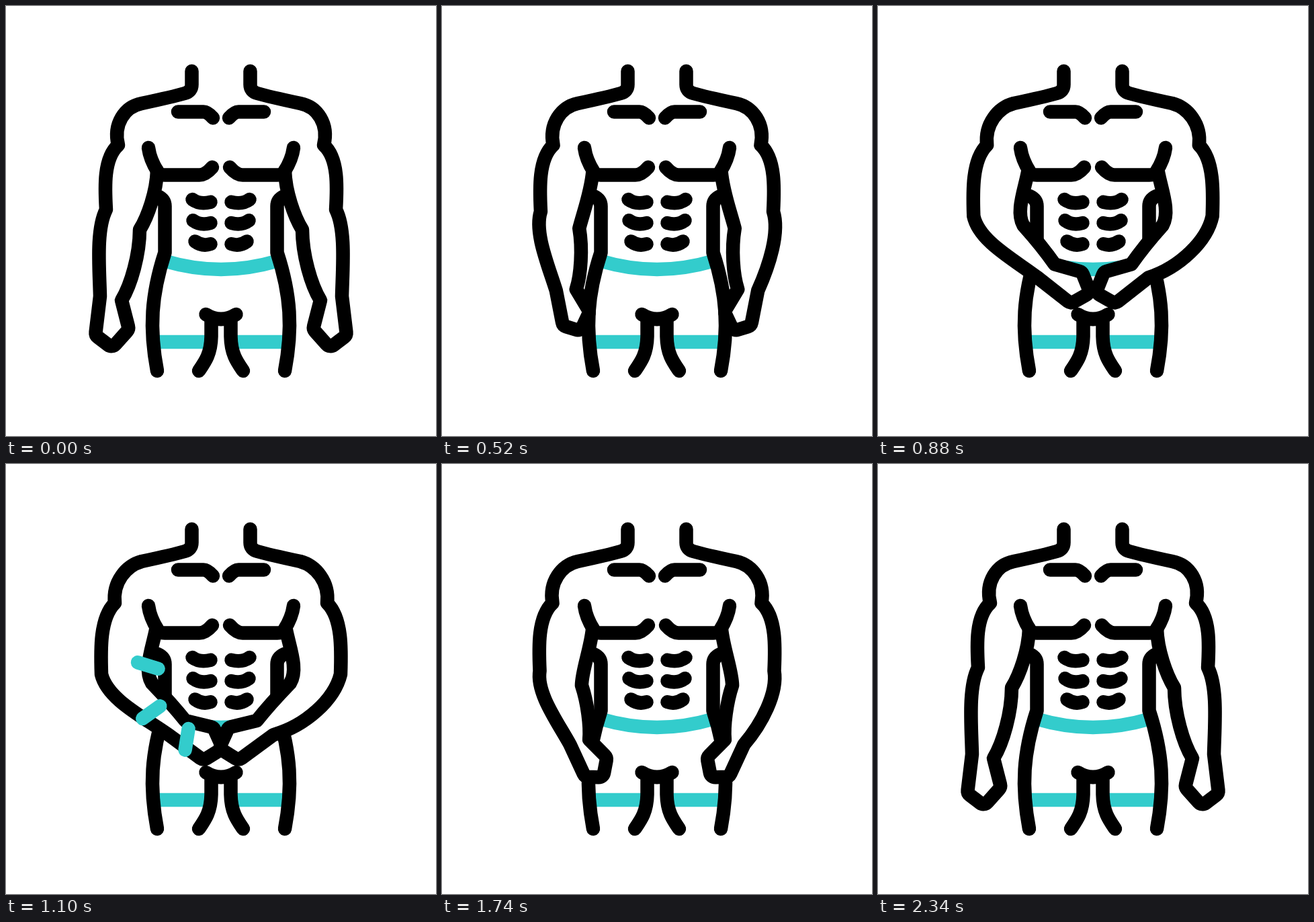
Animation of 640x640 px, one loop 2.4 s. Source, as an HTML page with a canvas:

```html
<!DOCTYPE html>
<html lang="en">
<head>
<meta charset="utf-8">
<title>Flexing torso</title>
<style>
  html, body { margin: 0; width: 100%; height: 100%; overflow: hidden; background: #fff; }
  canvas { display: block; }
</style>
</head>
<body>
<canvas id="stage" width="640" height="640"></canvas>
<script>
const ctx = document.getElementById('stage').getContext('2d');
const SIZE = 640, LOOP = 2400, HALF = 1160;
const INK = '#000', TEAL = '#33cccc';

// Joints of the left arm: relaxed x, y, then flexed x, y.
const JOINTS = {
  deltoid:    [167, 207, 162, 207],
  elbow:      [149, 303, 142, 313],
  wrist:      [140, 432, 242, 403],
  heel:       [133, 490, 294, 441],
  knuckle:    [158, 509, 323, 423],
  thumb:      [183, 481, 309, 392],
  innerWrist: [172, 438, 267, 382],
  innerElbow: [199, 333, 217, 326],
  armpit:     [225, 245, 223, 247]
};
// How far each flexed forearm swells near the wrist, left and right.
const FOREARM_SWELL = [5, 22];

const clamp = v => Math.min(1, Math.max(0, v));
const mix = (a, b, p) => a + (b - a) * p;
const smooth = v => v * v * (3 - 2 * v);

// Strong symmetric ease: cubic-bezier(.8, 0, .2, 1).
function ease(u) {
  let lo = 0, hi = 1;
  for (let i = 0; i < 24; i++) {
    const s = (lo + hi) / 2, r = 1 - s;
    if (2.4 * s * r * r + 0.6 * s * s * r + s * s * s < u) lo = s; else hi = s;
  }
  return smooth((lo + hi) / 2);
}

// Curve from a to b, pushed sideways by k1 and k2 along the way.
function muscle(path, [ax, ay], [bx, by], k1, k2) {
  const dx = bx - ax, dy = by - ay, len = Math.hypot(dx, dy);
  const at = (f, k) => [ax + dx * f - dy / len * k, ay + dy * f + dx / len * k];
  path.bezierCurveTo(...at(0.24, k1), ...at(0.67, k2), bx, by);
}

function armPath(flex, swell) {
  const j = {};
  for (const name in JOINTS) {
    const [x, y, fx, fy] = JOINTS[name];
    j[name] = [mix(x, fx, flex), mix(y, fy, flex)];
  }
  const shoulder = [202, 145];
  const path = new Path2D('M276.500 97V117Q276.500 127 266 130Q249 135 202 145');
  muscle(path, shoulder, j.deltoid, mix(20, 16, flex), mix(22, 20, flex));
  muscle(path, j.deltoid, j.elbow, 18, 8);
  muscle(path, j.elbow, j.wrist, mix(13, 22, flex), mix(4, swell, flex));
  const hand = [j.heel, j.knuckle, j.thumb, j.innerWrist];
  for (let i = 0; i < 3; i++) path.arcTo(...hand[i], ...hand[i + 1], 8);
  path.lineTo(...j.innerWrist);
  muscle(path, j.innerWrist, j.innerElbow, mix(8, 1, flex), mix(9, 1, flex));
  muscle(path, j.innerElbow, j.armpit, mix(6, -14, flex), mix(8, -3, flex));
  return path;
}

function stroke(path, color = INK) {
  ctx.strokeStyle = color;
  ctx.stroke(new Path2D(path));
}

function mirrored(draw) {
  draw(0);
  ctx.save();
  ctx.translate(SIZE, 0);
  ctx.scale(-1, 1);
  draw(1);
  ctx.restore();
}

function drawChest() {
  stroke('M256 157.500H294Q300 157.500 308 166.500');
  stroke('M212 211C214 226 219 236 226 247Q229 251.500 236 251.500H288Q297 251.500 307 240');
  for (let row = 0; row < 3; row++) {
    const x = 277.5 + row * row, y = 288 + 31.2 * row;
    stroke(`M${x} ${y}Q${x + 11} ${y + 8} 304.500 ${y + 3.8}`);
  }
}

function drawSparks(t) {
  const head = smooth(clamp((t - 940) / 150));
  const tail = smooth(clamp((t - 1110) / 150));
  if (head <= tail) return;
  [99, 144.5, 197].forEach((degrees, i) => {
    const angle = degrees * Math.PI / 180, near = 73 - 7 * i;
    const point = f => {
      const r = near + 32 * f;
      return `${283 + r * Math.cos(angle)} ${322 + r * Math.sin(angle)}`;
    };
    stroke(`M${point(tail)}L${point(head)}`, TEAL);
  });
}

function render(t) {
  ctx.fillStyle = '#fff';
  ctx.fillRect(0, 0, SIZE, SIZE);
  ctx.lineWidth = 20.5;
  ctx.lineJoin = 'round';
  ctx.lineCap = 'butt';
  stroke('M238 380Q320 404 402 380M220 500H305M335 500H416', TEAL);
  ctx.lineCap = 'round';
  mirrored(() => stroke('M226 283Q236.500 288 236.500 298V367C216 430 213 480 225 543'));

  const flex = ease(clamp(t < HALF ? t / HALF : 2 - t / HALF));
  mirrored(side => {
    const arm = armPath(flex, FOREARM_SWELL[side]);
    ctx.fill(arm);
    stroke(arm);
  });
  mirrored(() => {
    drawChest();
    stroke('M305.500 466V492C305 518 296 530 287 543');
  });
  stroke('M297.500 459Q320 473 342.500 459');
  drawSparks(t);
}

const start = performance.now();
function frame() {
  render((performance.now() - start) % LOOP);
  requestAnimationFrame(frame);
}
frame();
</script>
</body>
</html>
```
